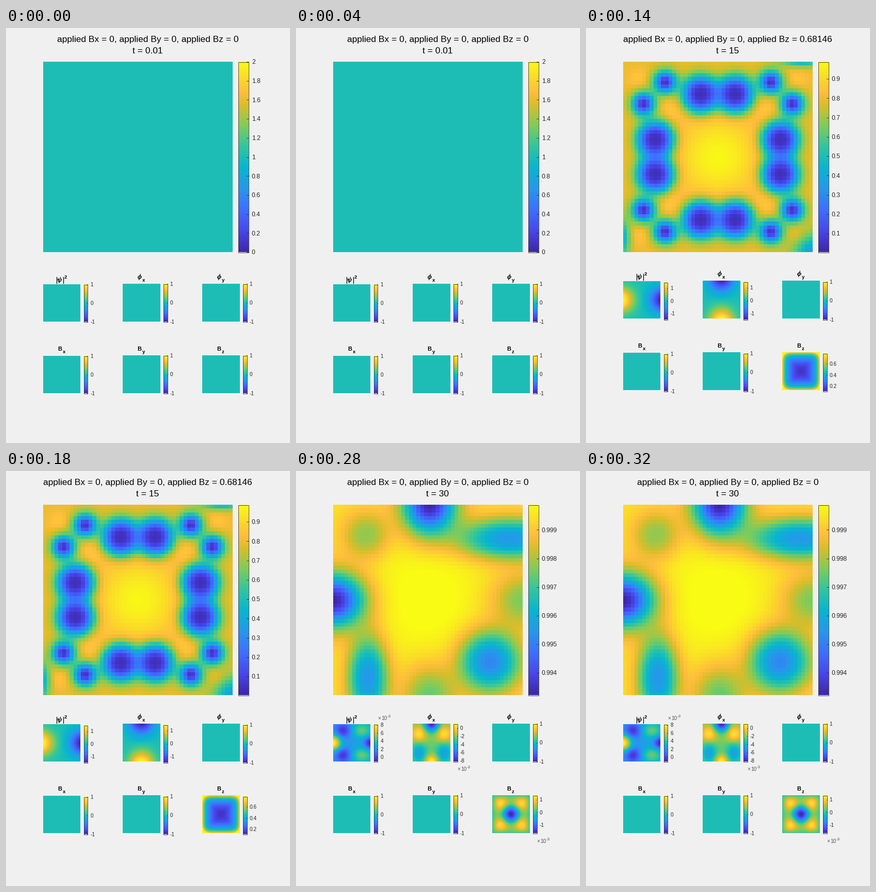
These frames come from a looping animation (550x800 px, 350 ms). A matplotlib script:

```python
import numpy as np
import matplotlib.pyplot as plt
from matplotlib.animation import FuncAnimation
from matplotlib.colors import LinearSegmentedColormap
from matplotlib.patches import Rectangle
from matplotlib.patheffects import withStroke

plt.rcParams["font.family"] = "Liberation Sans"
plt.rcParams["mathtext.fontset"] = "cm"

HUES = "3e26a8 4747eb 3e6fff 2797eb 08b5d0 31c69f 81cc59 dcbd29 febe3d fccf30 f9fb15".split()
STOPS = [*range(0, 50, 7), 53, 56, 63]
CMAP = LinearSegmentedColormap.from_list(
    "blue_to_yellow", [(s / 63, "#" + h) for s, h in zip(STOPS, HUES)], 256)
INK = "#262626"

N = 50
LEFT, TOP, SIDE = 72, 65, 367
MID_X, MID_Y = LEFT + SIDE / 2, TOP + SIDE / 2
unit = (np.arange(N) + 0.5) / N
UNIT = np.meshgrid(unit, unit)
STAGE = (SIDE * (UNIT[0] - 0.5), SIDE * (UNIT[1] - 0.5))  # pixels from the centre
FLAT = np.full((N, N), 0.5)
EDGE = SIDE / 2
SIGNS = [(sx, sy) for sx in (-1, 1) for sy in (-1, 1)]


def bump(cx, cy, rx, ry=None, p=1, grid=STAGE):
    q = ((grid[0] - cx) / rx) ** 2 + ((grid[1] - cy) / (ry or rx)) ** 2
    return np.exp(-q ** p)


def octet(a, b):
    """Eight points of square symmetry around the centre."""
    return [(sx * u, sy * v) for sx, sy in SIGNS for u, v in ((a, b), (b, a))]


def dig(field, points, r, depth, p=1):
    for cx, cy in points:
        field = field * (1 - depth * bump(cx, cy, r, p=p))
    return field


# Main density fields, scaled to 0..1

def density_entering():
    field = 0.83 + 0.17 * bump(0, 0, 100)
    for sx, sy in SIGNS:
        field = field + 0.05 * bump(sx * 148, sy * 148, 30)
    for g in STAGE:
        field = field * (1 - 0.2 * np.exp(-((EDGE - abs(g)) / 20) ** 2))
    sides = [(0, -EDGE), (0, EDGE), (-EDGE, 0), (EDGE, 0)]
    field = dig(field, sides, 105, 0.99, 2.4)
    return dig(field, octet(90, 146), 23, 0.85)


def density_vortices():
    field = 0.8 + 0.19 * bump(0, 0, 80)
    for sx, sy in SIGNS:
        field = field + 0.07 * (bump(sx * 95, sy * 95, 30) + bump(sx * 153, sy * 150, 22))
    field = dig(field, octet(102, 144), 22, 0.95)
    field = dig(field, octet(33, 121), 37, 0.96, 1.4)
    # Weak spots where the next vortices enter
    for cx, cy, rx, ry in ((186, 186, 38, 38), (162, -188, 38, 13), (-190, 156, 18, 35)):
        field = field * (1 - 0.58 * bump(cx, cy, rx, ry))
    return field


def density_free(sides, lumps):
    """Depths: sides clockwise from the top, lumps clockwise from top left."""
    field = 0.93 + 0.09 * bump(-5, -5, 120)
    top, right, bottom, left = sides
    for s, depth in ((-1, top), (1, bottom)):
        field = field * (1 - depth * bump(3, s * EDGE, 51, 57))
    for s, depth in ((-1, left), (1, right)):
        field = field * (1 - depth * bump(s * EDGE, 1, 60, 52))
    shapes = ((-120, -125, 46, 46), (158, -118, 100, 40),
              (120, 119, 59, 59), (-116, 150, 39, 80))
    for shape, depth in zip(shapes, lumps):
        field = field * (1 - depth * bump(*shape, p=1.15))
    return field


# Small panel fields

def small(*args):
    return bump(*args, grid=UNIT)


def phi_driven():
    x, y = UNIT
    side = np.exp(-(x / 0.29) ** 1.4 - ((y - 0.5) / 0.33) ** 2)
    return 0.5 + 0.5 * (side - side[:, ::-1])


def phi_free(base, rim, hill, pit):
    field = base + (1 - base) * small(0, 0.5, 0.2) - rim * small(1, 0.5, 0.16)
    for y in (0.17, 0.83):
        field = field + hill * small(0.77, y, 0.27, 0.2) - pit * small(0.27, y, 0.22, 0.2)
    return field


def rim_distance(p):
    u, v = (abs(2 * g - 1) for g in UNIT)
    return np.minimum((u ** p + v ** p) ** (1 / p), 1)


def field_driven(bulk):
    m = rim_distance(6)
    return 0.05 + bulk * m ** 2 + (0.93 - bulk) * m ** 12


def field_free(base):
    hills = sum(small(0.5 + 0.28 * sx, 0.5 + 0.29 * sy, 0.24) for sx, sy in SIGNS)
    hills = 0.4 * hills * (1 - rim_distance(12) ** 6)
    return base + hills - (base + 0.09) * small(0.5, 0.5, 0.22)


IDLE = (-1, 1, 1)


def scene(bz, t, main, bar, phi=FLAT, phi_scale=IDLE, field=FLAT, field_scale=IDLE):
    """Scales are (low, high, tick step)."""
    lo, hi, step = phi_scale
    fields = [phi, 1 - phi.T, FLAT, FLAT, FLAT, field]
    scales = [phi_scale, (-hi, -lo, step), IDLE, IDLE, IDLE, field_scale]
    return bz, t, main, bar, list(zip(fields, scales))


SCENES = [
    scene("0", "0.01", FLAT, (0, 2, 0.2)),
    scene("0.62494", "7.5", density_entering(), (0.0034, 0.9886, 0.1),
          phi_driven(), (-1.55, 1.55, 1), field_driven(0.75), (0.12, 0.718, 0.2)),
    scene("0.68146", "15", density_vortices(), (0.0034, 0.9886, 0.1),
          phi_driven(), (-1.48, 1.48, 1), field_driven(0.6), (0.116, 0.786, 0.2)),
    scene("0", "22.5", density_free((0.98, 0.87, 0.86, 0.97), (0.34, 0.58, 0.58, 0.55)),
          (0.9066, 0.99995, 0.01),
          phi_free(0.42, 0.5, 0.3, 0.2), (-0.0125, 0.0221, 0.01),
          field_free(0.64), (-6, 3.4, 2)),
    scene("0", "30", density_free((1, 0.3, 0.33, 1), (0.27, 0.63, 0.69, 0.64)),
          (0.99322, 0.99988, 0.001),
          phi_free(0.35, 0.36, 0.28, 0.3), (-1.1, 8.2, 2),
          field_free(0.56), (-1.63, 1.35, 1)),
]
PANEL_RISE = (0, 4, 6, 6, 6)
BAR_RISE = (0, 4, 4, 6, 6)
# (panel, vertical offset) of the power-of-ten notes
POWERS = {3: [(5, 87.5)], 4: [(0, -11.5), (1, 86.5), (5, 87.5)]}

fig = plt.figure(figsize=(5.5, 8), dpi=100, facecolor="#f0f0f0")
ax = fig.add_axes([0, 0, 1, 1])


def write(x, yc, text, size, color=INK, **kw):
    ax.text(x, yc + 0.36 * size, text, fontsize=size * 0.72, color=color, **kw)


def image(field, x, y, w, h):
    ax.imshow(field, extent=(x, x + w, y + h, y), cmap=CMAP, vmin=0, vmax=1,
              aspect="auto", interpolation="nearest")


def line(xs, ys, color=INK, lw=0.55):
    ax.plot(xs, ys, color=color, lw=lw)


def colorbar(x, y, w, h, scale, text_x, size):
    lo, hi, step = scale
    image(np.linspace(1, 0, 256)[:, None], x, y, w, h)
    ax.add_patch(Rectangle((x, y + 1), w, h, fill=False, ec=INK, lw=0.55))
    first, last = int(np.ceil(lo / step - 1e-9)), int(np.floor(hi / step + 1e-9))
    for k in range(first, last + 1):
        ty = y + h * (hi - k * step) / (hi - lo)
        line([x + w - 0.01 * h, x + w], [ty, ty])
        write(text_x, ty, f"{k * step:g}", size)


def greek(x, yc, name):
    write(x, yc, rf"$\{name}$", 13, "black", ha="center",
          path_effects=[withStroke(linewidth=0.35, foreground="black")])


def panel_title(k, mid, top):
    bold = dict(color="black", weight="bold")
    if k == 0:
        greek(mid - 3.8, top - 9, "psi")
        for x in (mid - 10.3, mid + 3):
            line([x, x], [top - 13.5, top - 2], "black", 0.9)
        write(mid + 4.8, top - 13.5, "2", 9.5, **bold)
        return
    if k < 3:
        greek(mid - 2.7, top - 14.9, "phi")
    else:
        write(mid - 8.3, top - 13.5, "B", 11, **bold)
    write(mid + 1.2, top - 8.2, "xyxyz"[k - 1], 9.5, **bold)


def power_note(x, yc):
    gray = "#555555"
    write(x, yc, "×", 10, gray)
    write(x + 7, yc, "10", 10, gray)
    write(x + 18.5, yc - 3.5, "-3", 8, gray)


def draw(i):
    bz, t, main, bar, panels = SCENES[i]
    ax.cla()
    ax.axis("off")
    write(274.5, 21, f"applied Bx = 0, applied By = 0, applied Bz = {bz}",
          17.33, "black", ha="center")
    write(274.5, 43, f"t = {t}", 17.33, "black", ha="center")
    image(main, LEFT, TOP, SIDE, SIDE)
    colorbar(450, TOP, 20, SIDE, bar, 476, 12)

    places = [(LEFT + 154 * (k % 3), 493 + 138 * (k // 3)) for k in range(6)]
    for k, (field, scale) in enumerate(panels):
        x, y = places[k]
        wide = int(k % 3 > 0)  # the first column is one pixel smaller
        size = 72 + wide
        top = y + 1 - wide
        image(field, x, top - PANEL_RISE[i], size, size)
        colorbar(x + 79, top - BAR_RISE[i], 7 + wide, size, scale, x + 91.3, 10)
        panel_title(k, x + 36.3, y + 0.5 - PANEL_RISE[i])
    for k, dy in POWERS.get(i, []):
        x, y = places[k]
        power_note(x + 86.5, y + 0.5 - PANEL_RISE[i] + dy)
    ax.set_xlim(0, 550)
    ax.set_ylim(800, 0)


anim = FuncAnimation(fig, draw, frames=len(SCENES), init_func=lambda: None,
                     interval=70, repeat=True, repeat_delay=0)
plt.show()
```
